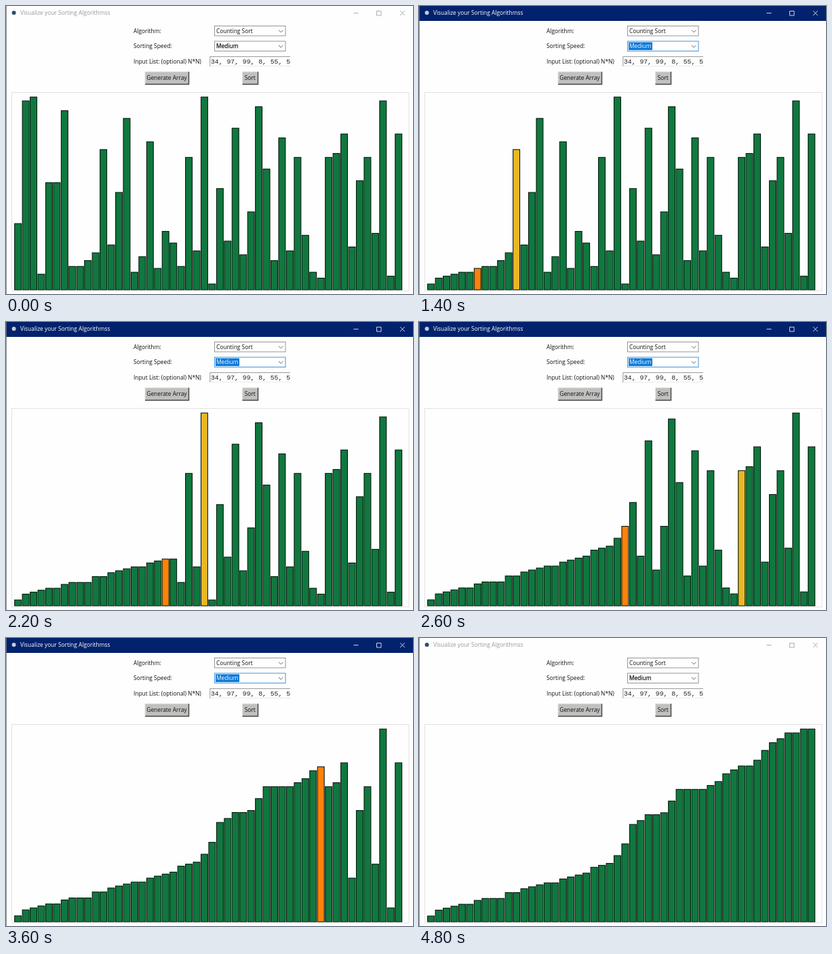
An HTML page for the animation above (5 s loop, 600 by 425 pixels).

```html
<!DOCTYPE html>
<html lang="en">
<head>
<meta charset="utf-8">
<title>Sorting visualizer</title>
<style>
  html, body { margin: 0; width: 100%; height: 100%; overflow: hidden; background: #fefefe; }
  svg { display: block; width: 600px; height: 425px; }
  text { font: 8.4px "Open Sans", "Noto Sans", sans-serif; fill: #111; }
  .mono { font: 9.75px "Liberation Mono", monospace; fill: #222; }
  .line { fill: none; stroke: #8a8a8a; stroke-width: 0.9; }
  .title { fill: #999; }
  .icon { fill: #2b4f73; }
  .controls { fill: none; stroke: #999; stroke-width: 0.8; }
  .bar-bg { fill: #fefefe; }
  .speed { stroke: #111; stroke-width: 0.25; }
  .selection { fill: none; }
  .focused .title { fill: #fff; }
  .focused .icon { fill: #c3cbdc; }
  .focused .controls { stroke: #fff; }
  .focused .bar-bg { fill: #02226d; }
  .focused .speed { fill: #fff; stroke: none; }
  .focused .selection { fill: #0a78d7; }
  .focused .combo-speed { stroke: #2f8bd8; }
  #bars rect { stroke: #071a10; stroke-width: 1.1; }
</style>
</head>
<body>
<svg id="stage" viewBox="0 0 600 425">
  <rect width="600" height="425" fill="#fefefe"/>
  <rect class="bar-bg" width="600" height="22"/>
  <rect width="0.8" height="425" fill="#6b7478"/>
  <circle class="icon" cx="11.6" cy="10" r="3"/>
  <text class="title" x="21" y="13.2">Visualize your Sorting Algorithmss</text>
  <path class="controls" d="M512.5 10.5h7M546.5 7.5h6.5v6.5h-6.5zM581 7.2l6.8 6.8M587.8 7.2L581 14"/>

  <text x="188" y="40">Algorithm:</text>
  <text x="188" y="62.3">Sorting Speed:</text>
  <text x="188" y="85">Input List: (optional) N*N)</text>

  <rect class="line" x="307.5" y="29.5" width="104.5" height="14.5"/>
  <text x="310" y="40">Counting Sort</text>
  <rect class="line combo-speed" x="307.5" y="52" width="104.5" height="14.5"/>
  <rect class="selection" x="309" y="53.5" width="35" height="11.5"/>
  <text class="speed" x="310" y="62.3">Medium</text>
  <path class="line" d="M402 35.5l3.2 3.2 3.2-3.2M402 58l3.2 3.2 3.2-3.2" style="stroke:#555"/>

  <svg x="300" y="73" width="119" height="17" viewBox="300 73 119 17">
    <path class="line" d="M300.8 89V74.7H419"/>
    <path d="M301 88.8H419" stroke="#e6e6e6" stroke-width="0.8"/>
    <text class="mono" x="302" y="85">34, 97, 99, 8, 55, 5</text>
  </svg>

  <g id="buttons"></g>
  <rect x="8.5" y="127.5" width="585.5" height="293" fill="none" stroke="#e2e2e2"/>
  <g id="bars"></g>
  <path id="cursor" d="M0 0v9.2l2.1-1.9 1.5 3.5 1.5-.7-1.5-3.3h2.9z" fill="#fff" stroke="#111" stroke-width="0.8"/>
</svg>
<script>
const LOOP = 5000, TICK = 200;
const SORT_START = 6, FOCUS_START = 5, FOCUS_END = 24;
const GREEN = '#10783f', ORANGE = '#fd820a', YELLOW = '#e8b824';

const values = [
  34, 97, 99, 8, 55, 55, 92, 12, 12, 15, 19, 72, 23, 50, 88, 9, 17, 76, 11, 30, 24, 12, 68, 20, 99,
  3, 52, 25, 83, 18, 40, 94, 62, 15, 78, 20, 68, 28, 9, 6, 68, 70, 80, 22, 56, 68, 29, 97, 7, 80
];
const sorted = [...values].sort((a, b) => a - b);
// Last index written at each tick of the sort
const writes = [4, 6, 9, 13, 15, 19, 21, 25, 28, 31, 34, 37, 39, 43, 46];
const cursorStops = { 3: [432, 107], 4: [371, 97], 5: [544, 77.5] };

const byId = id => document.getElementById(id);
const stage = byId('stage'), cursor = byId('cursor');

function add(parent, tag, attrs, text = '') {
  const node = document.createElementNS('http://www.w3.org/2000/svg', tag);
  for (const name in attrs) node.setAttribute(name, attrs[name]);
  node.textContent = text;
  parent.append(node);
  return node;
}

function addButton(x, width, label) {
  const group = byId('buttons'), y = 97, height = 18.5;
  add(group, 'rect', { x, y, width, height, fill: '#c0c0be' });
  add(group, 'path', { d: `M${x} ${y + height}V${y}H${x + width}`, fill: 'none', stroke: '#e4e4e4' });
  add(group, 'path', {
    d: `M${x} ${y + height}H${x + width}V${y}`, fill: 'none', stroke: '#444', 'stroke-width': 1.4
  });
  add(group, 'text', { x: x + width / 2 - 0.3, y: 109.2, 'text-anchor': 'middle' }, label);
}
addButton(205, 64.5, 'Generate Array');
addButton(348.5, 23, 'Sort');

const bars = values.map((_, i) => add(byId('bars'), 'rect', { x: 12.7 + 11.45 * i, width: 9.9 }));

function drawBars(tick) {
  const step = tick - SORT_START;
  const sorting = step >= 0 && step < writes.length;
  const last = step < 0 ? -1 : sorting ? writes[step] : values.length - 1;
  const current = values.map((v, i) => i <= last ? sorted[i] : v);
  const scale = 284.5 / Math.max(...current);
  bars.forEach((bar, i) => {
    const height = current[i] * scale;
    bar.setAttribute('y', 418.8 - height);
    bar.setAttribute('height', height);
    bar.setAttribute('fill',
      sorting && i === last ? ORANGE : sorting && i === sorted[last] ? YELLOW : GREEN);
  });
}

let shown = -1;
function render(now) {
  const tick = Math.floor(now % LOOP / TICK);
  if (tick !== shown) {
    shown = tick;
    stage.classList.toggle('focused', tick >= FOCUS_START && tick < FOCUS_END);
    const stop = cursorStops[tick];
    cursor.style.display = stop ? '' : 'none';
    if (stop) cursor.setAttribute('transform', `translate(${stop})`);
    drawBars(tick);
  }
  requestAnimationFrame(render);
}
render(0);
</script>
</body>
</html>
```
